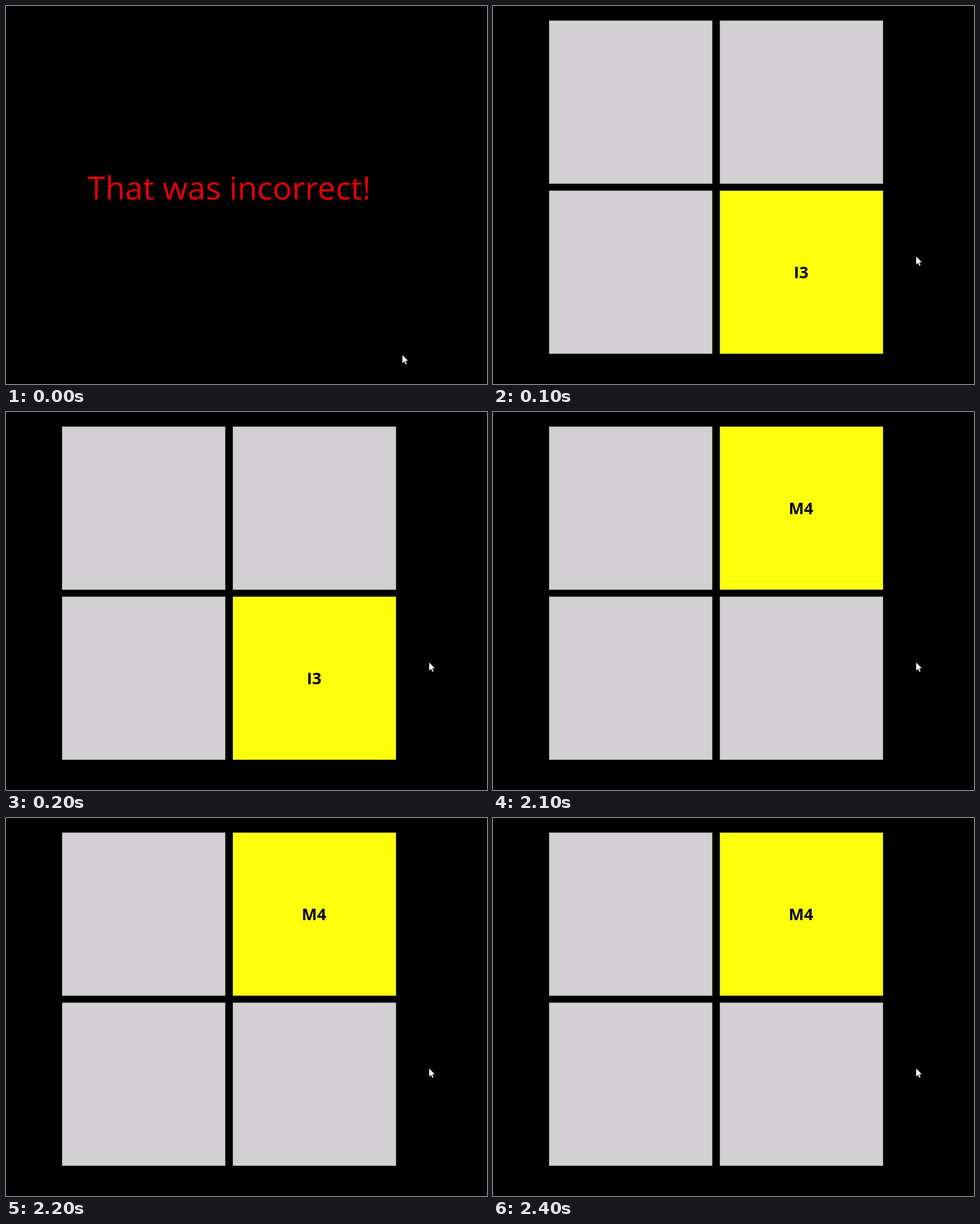
Write an HTML page that moves like this. It is 800 by 629 pixels and loops after 3 s.

```html
<!DOCTYPE html>
<html lang="en">
<head>
<meta charset="utf-8">
<title>Memory task</title>
<style>
  html, body { margin: 0; width: 100%; height: 100%; overflow: hidden; background: #000; }
  svg { display: block; width: 100vw; height: 100vh; font-family: "Open Sans", sans-serif; }

  .cell { fill: #d2d0d2; stroke: #939393; stroke-width: 1; }
  .lit { fill: #fdff0d; stroke: #a5a54a; }
  .label { font-size: 27px; font-weight: 700; fill: #000; }
  .message { font-size: 53.5px; }

  .scene { visibility: hidden; animation: 3s step-end infinite; }
  .wrong { animation-name: wrong; }
  .grid { animation-name: grid; }
  .first { animation-name: first; }
  .right { animation-name: right; }
  .second { animation-name: second; }
  .cursor { fill: #fff; animation: cursor 3s step-end infinite; }

  /* Cuts at 100, 1200 and 2100 ms */
  @keyframes wrong { 0% { visibility: visible } 3.3333%, 100% { visibility: hidden } }
  @keyframes first { 0% { visibility: hidden } 3.3333% { visibility: visible } 40%, 100% { visibility: hidden } }
  @keyframes right { 0% { visibility: hidden } 40% { visibility: visible } 70%, 100% { visibility: hidden } }
  @keyframes second { 0% { visibility: hidden } 70%, 100% { visibility: visible } }
  @keyframes grid {
    0%, 40% { visibility: hidden }
    3.3333%, 70%, 100% { visibility: visible }
  }
  @keyframes cursor {
    0% { transform: translate(659.3px, 580.8px) }
    3.3333%, 100% { transform: translate(703.8px, 416.8px) }
  }
</style>
</head>
<body>
<svg viewBox="0 0 800 629">
  <defs><rect id="cell" width="271" height="271"/></defs>

  <g class="scene grid">
    <use href="#cell" class="cell" x="93.5" y="24.5"/>
    <use href="#cell" class="cell" x="377.5" y="24.5"/>
    <use href="#cell" class="cell" x="93.5" y="307.5"/>
    <use href="#cell" class="cell" x="377.5" y="307.5"/>
  </g>

  <g class="scene first">
    <use href="#cell" class="cell lit" x="377.5" y="307.5"/>
    <text class="label" x="500.2" y="452.5">I3</text>
  </g>

  <g class="scene second">
    <use href="#cell" class="cell lit" x="377.5" y="24.5"/>
    <text class="label" x="491.7" y="169.5">M4</text>
  </g>

  <text class="scene message wrong" x="135.6" y="322" fill="#e80006">That was incorrect!</text>
  <text class="scene message right" x="158.8" y="322" fill="#10940e">That was correct!</text>

  <path class="cursor" d="M0 0V13.4L3 10.6L5.3 15.6L7.2 14.8L5.1 9.8L9.3 9.5Z"/>
</svg>
</body>
</html>
```
